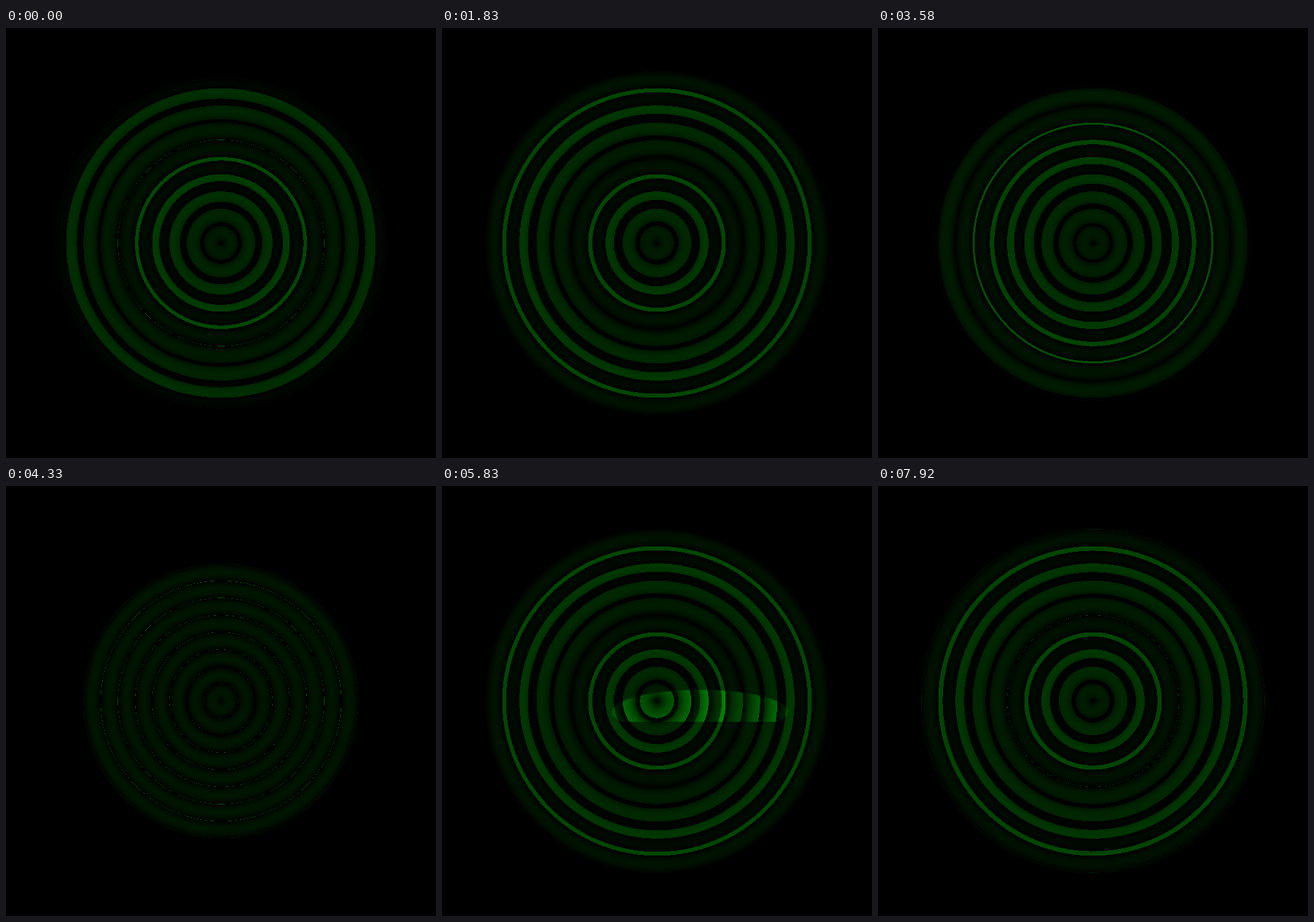
An HTML page for the animation above (8 s loop, 640x640 px).

```html
<!DOCTYPE html>
<html lang="en">
<head>
<meta charset="utf-8">
<title>Pulsing rings</title>
<style>
  html, body { margin: 0; width: 100%; height: 100%; overflow: hidden; background: #000; }
  svg { display: block; width: 100vw; height: 100vh; }
  #glow { mix-blend-mode: plus-lighter; }
</style>
</head>
<body>
<svg viewBox="0 0 640 640">
  <defs>
    <radialGradient id="redRings" gradientUnits="userSpaceOnUse" cx="320" cy="320" r="25.6" spreadMethod="repeat">
      <stop offset="0" stop-color="#000"/><stop offset="1" stop-color="#f00"/>
    </radialGradient>
    <radialGradient id="greenRings" gradientUnits="userSpaceOnUse" cx="320" cy="320" r="25.6" spreadMethod="repeat">
      <stop offset="0" stop-color="#000"/><stop offset="1" stop-color="rgb(0,88,0)"/>
    </radialGradient>
    <radialGradient id="shade" gradientUnits="userSpaceOnUse" cx="320" cy="320" r="32" spreadMethod="repeat">
      <stop offset="0" stop-color="#000" stop-opacity="0"/><stop offset="1" stop-color="#000"/>
    </radialGradient>
    <radialGradient id="soft">
      <stop offset=".96" stop-color="#fff"/><stop offset="1" stop-color="#000"/>
    </radialGradient>
    <mask id="spot" maskUnits="userSpaceOnUse" x="0" y="0" width="640" height="640">
      <ellipse id="blob" fill="url(#soft)"/>
    </mask>
  </defs>
  <rect width="640" height="640"/>
  <g mask="url(#spot)"><rect width="640" height="640" fill="url(#redRings)"/></g>
  <circle class="disc" cx="320" cy="320" fill="url(#greenRings)"/>
  <circle class="disc" cx="320" cy="320" fill="url(#shade)"/>
  <g id="glow" mask="url(#spot)"><circle class="disc" cx="320" cy="320" fill="url(#greenRings)"/></g>
</svg>
<script>
  const LOOP = 8000, STEP = 1000 / 12;
  const $ = id => document.getElementById(id);
  const discs = document.querySelectorAll('.disc');
  const blob = $('blob'), shade = $('shade'), glow = $('glow'), spot = $('spot');

  // Brief elliptical flashes, timed in steps; bottom cuts the ellipse flat
  const flashes = [
    { peak: 15, span: 3, cx: 120, cy: 500, rx: 260, ry: 230, bottom: 640, gain: .5 },
    { peak: 34, span: 3, cx: 225, cy: 430, rx: 354, ry: 615, bottom: 640, gain: .5 },
    { peak: 67, span: 4.5, cx: 384, cy: 336, rx: 240, ry: 60, bottom: 351, gain: .75 },
    { peak: 86, span: 3, cx: 110, cy: 510, rx: 250, ry: 230, bottom: 640, gain: .5 },
    { peak: 93, span: 2, cx: 320, cy: 320, rx: 130, ry: 420, bottom: 640, gain: .5 }
  ];

  function set(el, attrs) {
    for (const key in attrs) el.setAttribute(key, attrs[key]);
  }

  function radius(n) {
    const a = 2 * Math.PI * (n + 2) / 24.2;
    return 194.6 + 61.4 * Math.cos(a) - 2.7 * Math.sin(3 * a);
  }

  function draw(ms) {
    const n = Math.floor((ms % LOOP + 5) / STEP) % 96;
    const r = radius(n);
    discs.forEach(d => set(d, { r }));
    set(shade, { r: r / 8 });

    const f = flashes.find(e => Math.abs(n - e.peak) < e.span);
    if (f) {
      const size = 1 - ((n - f.peak) / f.span) ** 2;
      set(blob, { cx: f.cx, cy: f.cy, rx: f.rx * size, ry: f.ry * size });
      set(spot, { height: f.bottom });
    } else {
      set(blob, { rx: 0, ry: 0 });
    }
    set(glow, { opacity: f ? f.gain : 0 });
  }

  const start = performance.now();
  function tick() {
    draw(performance.now() - start);
    requestAnimationFrame(tick);
  }
  tick();
</script>
</body>
</html>
```
